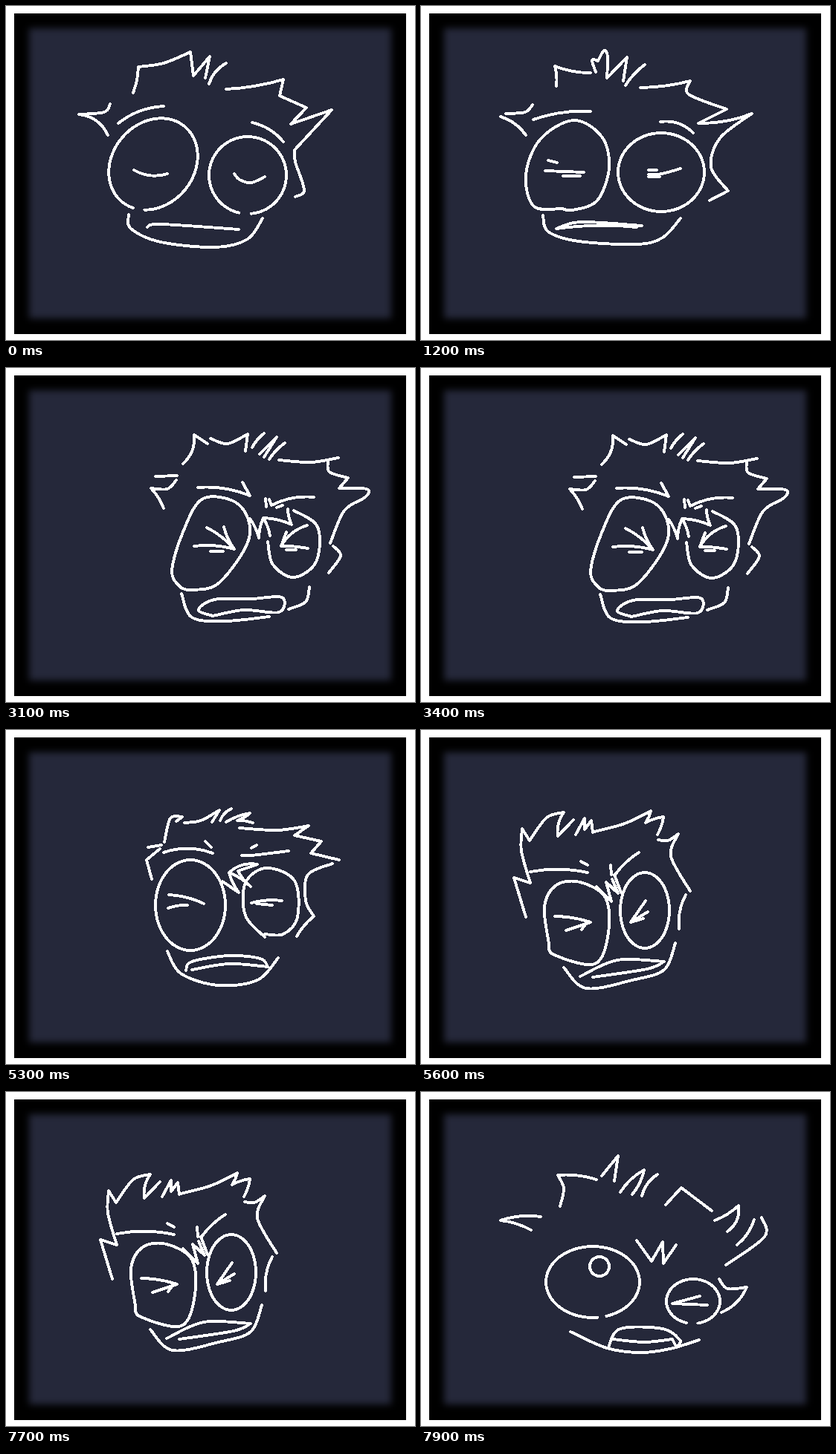
These frames come from a looping animation (550 px wide and 450 px high, 8 s). An HTML page:

```html
<!DOCTYPE html>
<html lang="en">
<head>
<meta charset="utf-8">
<title>Shaking head</title>
<style>
html, body { margin: 0; width: 100%; height: 100%; overflow: hidden; background: #fff; }
svg { display: block; width: 100%; height: 100%; }
</style>
</head>
<body>
<svg viewBox="0 0 550 450">
  <defs>
    <filter id="soft" x="-10%" y="-10%" width="120%" height="120%" color-interpolation-filters="sRGB">
      <feGaussianBlur stdDeviation="5"/>
    </filter>
    <clipPath id="panel"><rect x="22" y="21" width="506" height="410"/></clipPath>
  </defs>
  <rect width="550" height="450" fill="#fff"/>
  <rect x="11" y="10" width="527" height="432" fill="#000"/>
  <g clip-path="url(#panel)">
    <rect x="31" y="30" width="487" height="391" fill="#25283a" filter="url(#soft)"/>
  </g>
  <path id="face" fill="none" stroke="#fff" stroke-width="3.9" stroke-linecap="round" stroke-linejoin="round" shape-rendering="crispEdges"/>
</svg>
<script>
let d = '';

const pairs = v => v.flatMap((x, i) => i % 2 ? [] : [[x, v[i + 1]]]);

// Corner points joined by arcs; a positive bend bulges to the left of travel
function zig(bend, ...v) {
  const p = pairs(v);
  d += 'M' + p[0];
  for (let i = 1; i < p.length; i++) {
    const [x, y] = p[i - 1], [u, w] = p[i];
    d += `Q${(x + u) / 2 + bend * (w - y)} ${(y + w) / 2 - bend * (u - x)} ${u} ${w}`;
  }
}

const line = (...v) => zig(0, ...v);

// Smooth curve through all points
function curve(...v) {
  const p = pairs(v);
  d += 'M' + p[0];
  for (let i = 0; i < p.length - 1; i++) {
    const a = p[i - 1] || p[i], b = p[i], c = p[i + 1], e = p[i + 2] || c;
    const k = n => [b[n] + (c[n] - a[n]) / 6, c[n] - (e[n] - b[n]) / 6];
    const [x1, x2] = k(0), [y1, y2] = k(1);
    d += `C${x1} ${y1} ${x2} ${y2} ${c}`;
  }
}

// Ellipse, open when the angles do not span a full turn
function oval(cx, cy, rx, ry, tilt = 0, from = 0, to = 360) {
  const rad = Math.PI / 180, c = Math.cos(tilt * rad), s = Math.sin(tilt * rad), n = 60;
  for (let i = 0; i <= n; i++) {
    const a = (from + (to - from) * i / n) * rad;
    const x = rx * Math.cos(a), y = ry * Math.sin(a);
    d += `${i ? 'L' : 'M'}${cx + x * c - y * s} ${cy + x * s + y * c}`;
  }
}

function calm() {
  curve(171,117, 176,100, 178,82);
  curve(178,82, 212,77, 248,62);
  line(248,62, 252,94, 274,68, 268,97);
  zig(.2, 273,105, 296,77);
  zig(-.06, 296,112, 373,99);
  line(373,99, 368,121, 404,137, 383,159, 438,140, 388,194);
  curve(388,194, 389,210, 401,248, 389,257);
  curve(140,132, 132,143, 98,146);
  zig(.28, 98,146, 137,174);
  zig(.16, 151,158, 212,135);
  zig(.17, 331,157, 373,183);
  oval(198,213, 66,55, -50, 162,506);
  zig(-.22, 172,221, 217,226);
  oval(325,228, 52,52, 0, 103,445);
  curve(307,226, 314,234, 330,238, 348,230);
  curve(165,281, 168,300, 208,318, 282,325, 325,314, 345,286);
  curve(190,298, 208,294, 313,301);
}

function tense() {
  zig(-.1, 182,108, 180,81, 228,90);
  curve(235,89, 230,73, 238,74);
  curve(238,74, 246,60, 251,68, 250,97);
  line(250,97, 277,69, 272,101);
  zig(.1, 275,107, 301,79);
  zig(-.06, 295,110, 362,101);
  curve(362,101, 360,119, 411,139);
  line(411,139, 373,158);
  zig(-.1, 373,158, 445,145);
  curve(445,145, 402,178, 390,217, 413,249);
  line(413,249, 388,262);
  curve(150,133, 140,143, 114,145);
  zig(.17, 107,149, 141,174);
  zig(.1, 151,153, 228,142);
  zig(.25, 322,156, 366,171);
  curve(190,273, 152,270, 141,228, 160,180, 205,154, 243,176, 253,218, 237,262, 204,275, 190,273);
  line(171,208, 183,211);
  line(167,222, 219,224);
  line(191,229, 214,229);
  oval(323,224, 58,53);
  line(306,221, 317,221);
  curve(349,219, 324,226, 306,227);
  line(306,230, 321,230);
  curve(164,282, 171,304, 212,317, 290,321, 325,312, 349,286);
  curve(297,296, 215,291, 182,300);
  zig(.06, 182,300, 290,298);
}

function turn() {
  zig(-.13, 204,128, 198,83);
  curve(198,83, 216,94, 234,92);
  zig(.2, 220,77, 234,102);
  curve(241,91, 270,89, 280,73);
  line(280,73, 277,104, 307,79, 300,102);
  line(290,59, 285,95);
  line(316,103, 308,121);
  zig(-.05, 324,125, 411,110, 397,132);
  zig(-.1, 397,132, 442,152);
  line(442,152, 414,163);
  zig(-.1, 414,163, 464,157);
  curve(441,173, 416,196, 415,225, 429,261);
  line(429,261, 417,260);
  curve(168,148, 148,156, 124,153);
  zig(.15, 124,153, 166,183);
  zig(.2, 185,167, 232,141);
  zig(.1, 366,162, 407,192);
  curve(198,287, 179,268, 182,215, 208,168, 252,165, 287,207, 270,259, 223,282);
  zig(-.1, 219,206, 249,225);
  zig(-.1, 208,227, 255,231);
  line(233,237, 251,239);
  zig(.1, 287,193, 295,234, 303,198, 324,205);
  zig(.3, 314,189, 326,210);
  zig(.2, 318,188, 340,204);
  curve(344,282, 303,242, 309,202, 352,180, 396,200, 400,245, 360,285);
  line(354,224, 344,231);
  zig(-.15, 334,241, 380,228);
  line(359,245, 351,249);
  curve(195,296, 208,322, 278,338, 340,323, 369,293);
  curve(338,311, 275,307, 221,313);
  line(221,313, 336,315);
}

function right() {
  zig(-.25, 243,130, 258,91);
  line(258,91, 276,103);
  curve(280,96, 303,103, 330,90);
  line(330,90, 327,113);
  zig(.1, 336,108, 352,89);
  line(346,117, 369,94, 352,121);
  zig(.1, 359,124, 380,102);
  curve(372,125, 415,128, 452,122);
  curve(438,126, 440,141, 465,149);
  line(465,149, 453,163);
  curve(453,163, 490,164, 488,175, 460,193, 441,237);
  curve(445,241, 455,254, 439,277);
  line(206,147, 235,146);
  curve(234,152, 222,164, 200,163);
  zig(.1, 200,163, 217,190);
  zig(.12, 263,162, 333,173);
  line(333,173, 323,155);
  line(354,177, 355,188);
  line(359,178, 362,186);
  zig(.15, 362,186, 419,175);
  line(369,189, 377,186);
  zig(.1, 333,204, 345,230, 351,203, 360,227);
  zig(.1, 352,203, 389,212, 384,191);
  rightEyes();
  curve(241,305, 255,337, 300,342, 359,336);
  curve(385,326, 408,316, 413,296);
  curve(283,335, 264,327, 285,313, 335,312, 376,310, 372,330, 325,327, 283,335);
}

function rightEyes() {
  curve(240,297, 228,275, 243,222, 270,177, 318,185, 332,230, 292,290, 255,300, 240,297);
  zig(.1, 275,216, 312,245, 298,215);
  zig(.1, 258,241, 312,245);
  line(280,248, 297,248);
  curve(357,235, 364,266, 392,283, 422,262, 424,215, 392,193);
  zig(-.2, 410,213, 375,241);
  line(375,241, 382,222);
  zig(.06, 375,241, 411,244);
  line(382,246, 395,246);
}

function back() {
  curve(213,151, 221,119, 237,117);
  line(237,117, 229,123);
  curve(240,125, 262,122, 287,108);
  line(287,108, 277,124);
  zig(.2, 288,122, 303,106);
  zig(.1, 296,124, 328,112, 311,122, 332,125);
  curve(314,132, 365,135, 407,129);
  line(407,129, 388,142, 424,150, 410,166, 448,175);
  curve(439,180, 406,195, 403,230, 414,251);
  zig(-.1, 414,251, 391,278);
  line(191,158, 209,155);
  line(207,160, 189,175, 196,201);
  zig(.18, 212,165, 278,166);
  line(268,150, 276,158);
  line(337,155, 330,159);
  curve(317,169, 330,169, 380,163);
  line(291,204, 313,219);
  zig(.1, 313,219, 300,192, 329,211, 312,190);
  zig(.25, 300,192, 338,181);
  line(338,181, 312,190);
  oval(248,236, 47,61);
  zig(.1, 219,222, 266,234);
  zig(.1, 218,240, 244,236);
  curve(348,279, 322,250, 322,206, 350,186, 388,203, 392,252, 373,275, 348,275);
  zig(.1, 330,233, 371,230);
  line(337,234, 358,236);
  curve(217,298, 235,328, 285,344, 338,337, 366,307);
  curve(242,324, 250,312, 300,304, 342,308, 352,319);
  curve(352,319, 300,315, 250,323);
}

function left() {
  line(127,254, 111,201, 133,208);
  curve(133,208, 121,165, 122,135);
  line(122,135, 132,151);
  curve(132,151, 155,120, 178,113);
  zig(-.2, 178,113, 170,145);
  line(170,145, 191,123);
  line(194,143, 206,121, 206,136, 215,124, 217,140);
  curve(219,139, 260,128, 295,111);
  zig(.1, 295,111, 288,127, 312,119, 304,143);
  curve(305,150, 318,151, 332,142);
  curve(332,142, 322,172, 348,219);
  zig(-.15, 342,224, 333,270);
  zig(.1, 133,193, 210,194);
  line(201,179, 210,184);
  line(241,184, 242,197);
  zig(.1, 247,197, 279,167);
  line(222,213, 242,233, 235,207, 251,222, 243,203);
  line(246,197, 255,221);
  curve(158,290, 152,240, 168,211, 200,207, 234,228, 238,275, 220,317, 165,305, 158,290);
  zig(.08, 166,253, 214,261);
  line(214,261, 181,272);
  line(207,264, 202,271);
  oval(287,245, 33,51);
  line(288,232, 268,261, 291,247);
  line(268,261, 285,256);
  curve(178,322, 208,350, 270,339, 313,325, 328,289);
  curve(200,334, 250,312, 313,314);
  curve(313,314, 290,324, 217,335);
}

function peek() {
  curve(187,154, 192,130, 184,112);
  zig(.1, 184,112, 236,118);
  line(243,113, 265,86, 260,120);
  zig(.13, 268,135, 300,105, 284,138);
  zig(.2, 297,140, 318,111);
  line(329,152, 350,129, 391,160);
  zig(-.1, 395,173, 427,153);
  zig(.3, 427,153, 412,188);
  zig(.15, 448,172, 425,206);
  curve(458,169, 462,195, 410,233);
  zig(-.12, 161,168, 107,173);
  zig(.1, 107,173, 148,186);
  curve(401,252, 412,265, 438,263);
  zig(.2, 438,263, 404,297);
  line(290,200, 310,228, 325,202, 326,231, 343,206);
  oval(231,256, 63,48, 0, 84,433);
  oval(240,235, 13,13);
  oval(366,282, 36,30, 0, 105,440);
  line(375,275, 338,285, 385,287);
  curve(201,323, 250,345, 295,351, 335,346, 374,334);
  curve(252,344, 268,319, 325,319, 348,334, 345,342);
  curve(258,333, 300,337, 338,333);
  line(338,333, 342,341);
}

const LOOP = 8000;
const steps = [];

function at(time, pose, dx = 0, dy = 0, sx = 1) {
  d = '';
  pose();
  steps.push({ time, d, transform: `matrix(${sx} 0 0 1 ${dx} ${dy})` });
}

at(0, calm);
at(1200, tense);
at(3000, turn);
at(3100, right, -5, -1);
at(3300, right, -2);
at(3400, right);
at(5300, back);
at(5400, back, -64, 1, 1.057);
at(5600, left, 14, -2);
at(5700, left, -3);
at(5800, left);
at(7700, left, 16, -2);
at(7800, peek, 3, 1);
at(7900, peek);

const face = document.getElementById('face');
let shown;

function draw(t) {
  const step = steps.filter(s => s.time <= t).pop();
  if (step === shown) return;
  shown = step;
  face.setAttribute('d', step.d);
  face.setAttribute('transform', step.transform);
}

const start = performance.now();
function tick() {
  draw(Math.max(0, performance.now() - start) % LOOP);
  requestAnimationFrame(tick);
}
tick();
</script>
</body>
</html>
```
